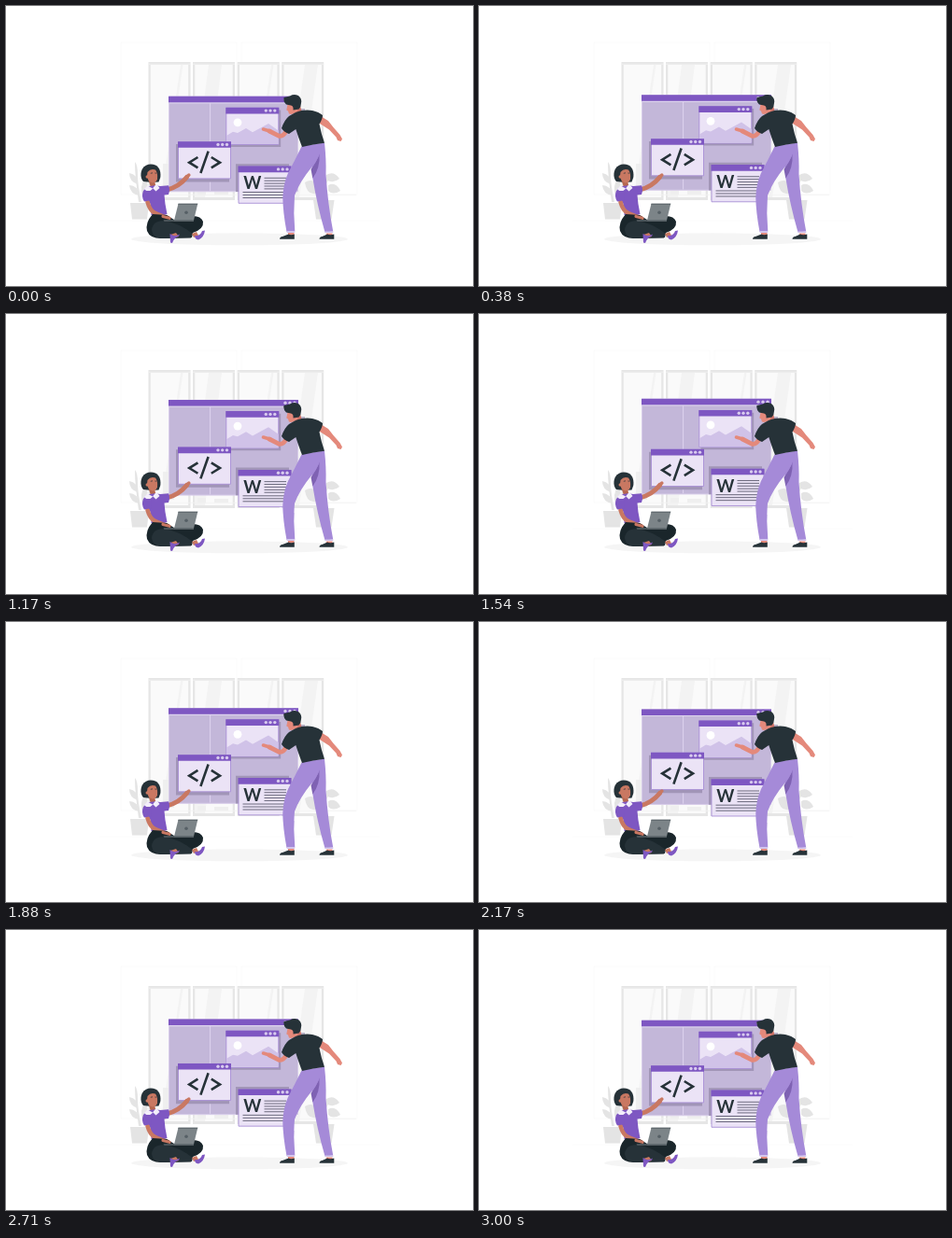
Animation, 500 px wide and 300 px high, one loop 3040 ms. Source, as an HTML page:

```html
<!DOCTYPE html>
<html lang="en">
<head>
<meta charset="utf-8">
<title>Web design team</title>
<style>
  html, body { margin: 0; width: 100%; height: 100%; overflow: hidden; background: #fff; }
  svg { display: block; width: 100vw; height: 100vh; }
  .dark { fill: #263238; }
  .violet { fill: #7e57c2; }
  .limb { fill: none; stroke-linecap: round; stroke-linejoin: round; }
  .her { stroke: #c97862; }
  .his { stroke: #e4897b; }
  .glyph { fill: none; stroke: #263238; stroke-width: 2.6; }
  .w { font: 700 18.2px Lato, "Open Sans", sans-serif; text-anchor: middle; }
</style>
</head>
<body>
<svg viewBox="0 0 500 300">
  <defs>
    <g id="pane">
      <path d="M0 0h45v148h-45z" fill="#e6e6e6"/>
      <path d="M2.3 3h40.4v142h-40.4z" fill="#fafafa"/>
      <path d="M0 2.3h45" stroke="#f2f2f2" stroke-width=".7"/>
    </g>
    <g id="card">
      <path d="M.5 .5h56v39.2h-56z" fill="#ebe3f6" stroke="#a98fd6" stroke-width=".9"/>
      <path d="M0 0h57v6.6h-57z" class="violet"/>
      <g fill="#d8cbee">
        <circle cx="43" cy="3.3" r="1.7"/><circle cx="47.7" cy="3.3" r="1.7"/><circle cx="52.5" cy="3.3" r="1.7"/>
      </g>
    </g>
    <clipPath id="inside"><path d="M174 96.700h139v102.300h-139z"/></clipPath>
  </defs>

  <!-- room -->
  <path d="M123 39h124v163h-124zM252 39h124v163h-124zM100 230H400" fill="none" stroke="#f9f9f9" stroke-width=".6"/>
  <use href="#pane" x="152.500" y="60"/>
  <use href="#pane" x="200" y="60"/>
  <use href="#pane" x="247.700" y="60"/>
  <use href="#pane" x="295.200" y="60"/>
  <path d="M187 63h2.500l-21 142h-2.500zM217 63h14l-18 142h-10.700v-30zM284 63h2.500l-21 142h-2.500zM320 63h14l-20 142h-14z" fill="#f3f3f3"/>
  <path d="M165 202.300H375" stroke="#f3f3f3" stroke-width=".8"/>
  <g fill="#efefef">
    <path d="M168 169h6v30h-6zM176 172h4v27h-4zM205 197h9v5h-9zM223 198h15v4h-15z"/>
  </g>
  <ellipse cx="250" cy="249.800" rx="116" ry="6.500" fill="#f5f5f5"/>

  <!-- plants -->
  <g fill="#e4e4e4">
    <path d="M133 211h20l-2 17.500h-16zM329 208h22.500l-3 20.500h-16.500z"/>
    <path d="M138 167q3 3 3 14t4 29h-3q-2-15-3-24t-1-19z"/>
    <path d="M132 179q9 1 9 12-9-3-9-12zM132 192q9 0 11 11-10-1-11-11zM149 184q6 8-2 20-5-10 2-20z"/>
    <path d="M343 181q8-5 14 4-7 6-14 1zM345 192q8-4 13 6-8 5-13 0zM320 189q8-5 14 3l-2 9q-10 2-12-12z"/>
    <path d="M338 208q0-18 7-24l1 1q-6 8-5 23z"/>
  </g>

  <!-- main window -->
  <g class="slow">
    <path d="M174.500 97h138v101.800h-138z" fill="#c3b7d9" stroke="#d8cdea"/>
    <path d="M175 103.200h137.500v1.200h-137.500z" fill="#ddd3ee"/>
    <path d="M218.600 104v94" stroke="#ddd3ee"/>
    <path d="M174 96.700h139v6.500h-139z" class="violet"/>
    <g fill="#d8cbee">
      <circle cx="299" cy="100" r="1.700"/><circle cx="304" cy="100" r="1.700"/><circle cx="309" cy="100" r="1.700"/>
    </g>
    <g clip-path="url(#inside)" fill="#a195b7">
      <path d="M237.500 111.500h56.700v39.500h-56.700zM246 169.200h57v40h-57z"/>
    </g>

    <use href="#card" x="235.300" y="108.800"/>
    <path d="M236 139L243 134.800 248 136 257 131 264 135.300 281 126 291.700 133.500V148H236z" fill="#d0c2e8"/>
    <circle cx="248" cy="124.800" r="4.400" fill="#fff"/>

    <use href="#card" x="248.500" y="171.600"/>
    <text class="w dark" x="263.700" y="196.400">W</text>
    <path d="M276.500 184.300h23.500M276.500 187.200h23.500M276.500 190.100h23.500M276.500 193h23.500M276.500 195.900h23.500M253.500 199.500h46.500M253.500 202.500h46.500M253.500 205.500h46.500" stroke="#4b4a5e" stroke-width=".8"/>
  </g>

  <!-- code window -->
  <g class="fast">
    <path d="M182 148h57v40.500h-57z" fill="#a195b7"/>
    <use href="#card" x="184" y="145.200"/>
    <path class="glyph" d="M205.400 162L196.200 167.700 205.400 173.400M219.800 162L229 167.700 219.800 173.400M216.600 155.600L208.400 179"/>
  </g>

  <!-- woman -->
  <g>
    <path class="dark" d="M147 188C143.500 184 144 178 146 174.500 149 169.500 155 168.500 160 170.500 165 173 166 179 165.200 184L163.500 188.500 156 189z"/>
    <path d="M152 185L159 187 161 196 156 197.500z" fill="#b5664f"/>
    <path d="M151.500 178Q155 173.500 160 175.500 162.700 179 162 185.500 160.500 190 156.500 189.500 152 188 151 182z" fill="#c97862"/>
    <circle cx="151.300" cy="183" r="1.800" fill="#c97862"/>
    <path d="M154.800 179.300l2.200-.5M159.500 179l1.700.2" stroke="#263238" stroke-width=".7"/>
    <path class="limb her" d="M172 197Q185 194 193.500 183.500" stroke-width="5"/>
    <path class="limb her" d="M192.500 184L195.800 181.200" stroke-width="3.600"/>
    <path class="violet" d="M149 195Q156 191 165 193L174 192.300Q176 197 174 202L169.500 202.500Q170 212 172.500 223 163 227 155.500 224 156 212 152 208 146 205 147 200 147 197 149 195z"/>
    <path d="M151.500 192.500L157 195.500 161 190.500 164.500 195 160.500 198.500 157.500 195.500 152.500 199.500 147.500 196z" fill="#f3eefa"/>
    <path class="limb her" d="M151.500 210Q154 219 159 221.500T173 227" stroke-width="4.600"/>
    <path class="violet" d="M147 198Q144.500 204 148 209.500L156 208 155.500 198z"/>
    <path d="M157 223Q149 232 151 241 154 249 166 249L199 248 200 243Q212 239 211 231 209 225 200 225L180 229 172 224z" fill="#1a262b"/>
    <path class="dark" d="M156 240Q157 230 169 230 184 232 200 244L198 248.500 166 249Q157 248 156 240z"/>
    <path d="M176 245l6-2 3 4-6 2zM199 244l5-2 2 4-5 2z" fill="#c97862"/>
    <path class="violet" d="M175.500 244Q180 248 186 244.500L185 246.500Q180 248 178 254L176 253.500zM202 246Q208 247 210 241L213 240.500Q212 248 206 250.500 202 250 202 246z"/>
    <path d="M184.500 211.800h20.800l-4.500 18.700h-21z" fill="#7c8488"/>
    <path d="M184.500 211.800h20.800l-.3 1h-20.800z" fill="#596267"/>
    <path d="M168.500 229.300H201V230.800H169.500z" fill="#596267"/>
    <circle cx="193" cy="221.300" r="1.800" fill="#566066"/>
    <path class="limb her" d="M168 225.500L175 227.300" stroke-width="3.200"/>
  </g>

  <!-- man -->
  <g>
    <path d="M312 110h8v4h-8z" fill="#b9b1c8"/>
    <path d="M336 117.500L345 123 350.500 130 357.500 138 360 142.500 358.500 145 355 144 353.500 140.500 346 132.500 336 126z" fill="#e4897b"/>
    <path d="M317 150L341 146.500Q343 165 342.500 180 344.500 212 350.200 241.500L341.500 242.500Q333 213 328.300 184L327 165z" fill="#a58ad8"/>
    <path d="M335.500 158Q332 168 326.500 175L328.300 184.500Q336.500 174 335.500 158z" fill="#7f62b3"/>
    <path d="M316.500 150.500L338 148Q337 162 327.500 172.500 314.500 188 309 203 307.500 222 309.300 241.500L300.500 242Q296.500 221 296.300 205 297 190 302 179 309.500 165 316.500 150.500z" fill="#a58ad8"/>
    <path d="M300.500 241h8.800l-.3 2h-8.200zM341.300 241.500h8.900l.2 1.500h-8.800z" fill="#d3c5ed"/>
    <path d="M302 243h6.500v3h-6.500zM343 243.500h6.500v2.500h-6.500z" fill="#e4897b"/>
    <path class="dark" d="M308.800 244.500V249.700H293Q293 247.500 296 247L302.500 244.500Q305 246 308.800 244.500zM351.300 244.500V249.700H335.500Q335.500 247.500 338.500 247L344 244.500Q347 246 351.300 244.500z"/>
    <path d="M307 107L315 107 317 114 311 117z" fill="#cf7468"/>
    <path d="M302 103L313 104 312 113Q307 117 303 115.500L302 112.500 300.300 111.500z" fill="#e4897b"/>
    <path class="dark" d="M297.500 98Q301 97 304 96.500 308 94 313 96 317 99 316 104 316 108 313.500 110.500L307.500 111.500Q308 107 305 106.500L300 105.500Q296.500 102 297.500 98z"/>
    <path class="limb his" d="M300 134Q297 140 292.500 139.300L282 134" stroke-width="4.800"/>
    <path class="limb his" d="M275.500 132L283 134.300" stroke-width="3.600"/>
    <path class="dark" d="M310 114Q319 110.500 328 112 335 113.500 339 117 339 121 335.500 126.500 337.500 137 341 146.800 329 148 317 151 313.500 142 310.300 132L303 137Q298 135.500 295 131 298 122 303 118z"/>
  </g>
</svg>
<script>
  const LOOP = 3040, LIFT = 6;
  const slow = document.querySelector(".slow"), fast = document.querySelector(".fast");

  // Rise at constant speed for half the period, then sink back.
  const bob = (t, period) => {
    const p = t % period / period;
    return -LIFT * (1 - Math.abs(1 - 2 * p));
  };
  const shift = (el, y) => el.setAttribute("transform", `translate(0 ${y.toFixed(3)})`);

  const start = performance.now();
  function draw(now) {
    const t = Math.max(0, now - start) % LOOP;
    shift(slow, bob(t, 3000));
    shift(fast, bob(t, 1500));
    requestAnimationFrame(draw);
  }
  draw(start);
</script>
</body>
</html>
```
